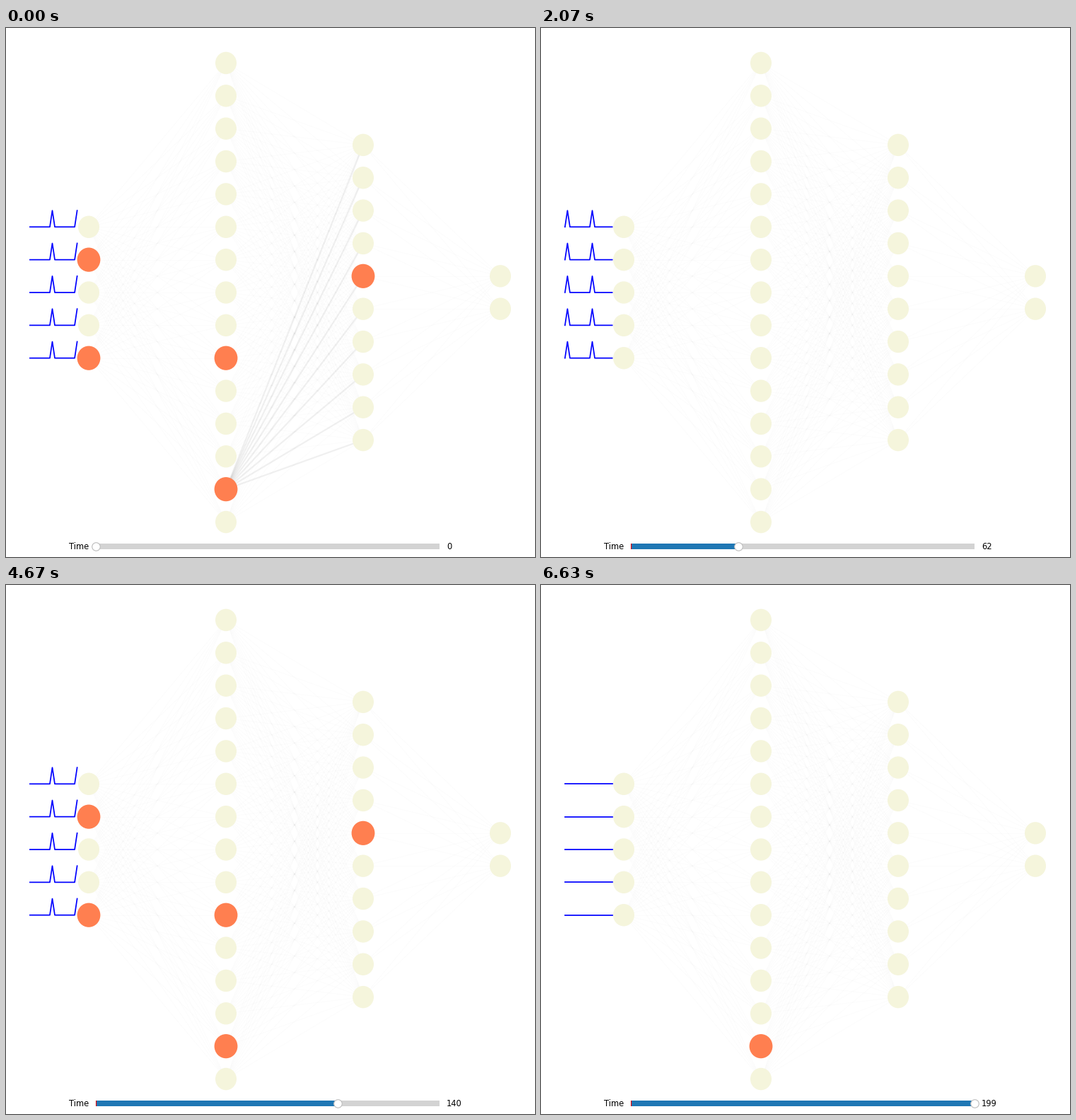
These frames come from a looping animation (748x748 px, 6660 ms). A matplotlib script:

```python
import numpy as np
import matplotlib.pyplot as plt
from matplotlib.animation import FuncAnimation
from matplotlib.collections import LineCollection
from matplotlib.patches import Ellipse
from matplotlib.widgets import Slider

SIZE = 748
STEPS = 200
LOOP_MS = 6660
PERIOD = 10          # steps between input spikes
WINDOW = 20          # samples shown on each input trace
GAP = 46.36          # vertical distance between neurons
LAYERS = [5, 15, 10, 2]
LAYER_X = [117, 311, 505, 699]

RESTING = dict(size=(30, 31.4), color="beige")
FIRING = dict(size=(32.8, 34.2), color="coral")

plt.rcParams["font.family"] = "DejaVu Sans"
fig = plt.figure(figsize=(9, 9), dpi=83.1112, facecolor="white")
ax = fig.add_axes([0, 0, 1, 1])
ax.set(xlim=(0, SIZE), ylim=(SIZE, 0))
ax.axis("off")


def layer_points(x, count):
    offsets = np.arange(count) - (count - 1) / 2
    return [(x, SIZE / 2 + GAP * k) for k in offsets]


def links(sources, targets):
    return [(a, b) for a in sources for b in targets]


points = [layer_points(x, n) for x, n in zip(LAYER_X, LAYERS)]

# Connections
edges = [e for a, b in zip(points, points[1:]) for e in links(a, b)]
ax.add_collection(LineCollection(edges, colors="black", alpha=0.01,
                                 linewidths=1, zorder=1))
active_edges = LineCollection(links([points[1][13]], points[2]),
                              colors="black", alpha=0.05,
                              linewidths=2, zorder=1)
ax.add_collection(active_edges)

# Neurons
neurons = {}
for layer, column in enumerate(points):
    for k, center in enumerate(column):
        neurons[layer, k] = ax.add_patch(
            Ellipse(center, *RESTING["size"], facecolor=RESTING["color"],
                    edgecolor="none", zorder=3))

# Input traces
trace_x = np.linspace(33.9, 100.6, WINDOW)
traces = [ax.plot(trace_x, np.full(WINDOW, y), color="blue", lw=1.5,
                  zorder=4)[0] for _, y in points[0]]

# Time slider
slider = Slider(fig.add_axes([0.17, 0.01, 0.65, 0.02]), "Time", 0, STEPS - 1,
                valinit=0, valstep=1, valfmt="%d")
slider.drawon = False


def firing_at(t):
    phase = t % PERIOD
    if phase == 0:
        return {(0, 1), (0, 4), (1, 9), (1, 13), (2, 4)}
    if phase == PERIOD - 1:
        return {(1, 13)}
    return set()


def update(t):
    # The sample nearest the neuron is the current one; later ones queue left.
    when = t + np.arange(WINDOW)[::-1]
    spikes = (when % PERIOD == 0) & (when < STEPS)
    for line, (_, y) in zip(traces, points[0]):
        line.set_ydata(y - spikes * GAP / 2)

    firing = firing_at(t)
    for key, neuron in neurons.items():
        style = FIRING if key in firing else RESTING
        neuron.width, neuron.height = style["size"]
        neuron.set_facecolor(style["color"])

    active_edges.set_visible(t == 0)
    slider.set_val(t)
    return []


anim = FuncAnimation(fig, update, frames=STEPS, init_func=lambda: update(0),
                     interval=LOOP_MS / STEPS, repeat=True, repeat_delay=0,
                     blit=False)
plt.show()
```
